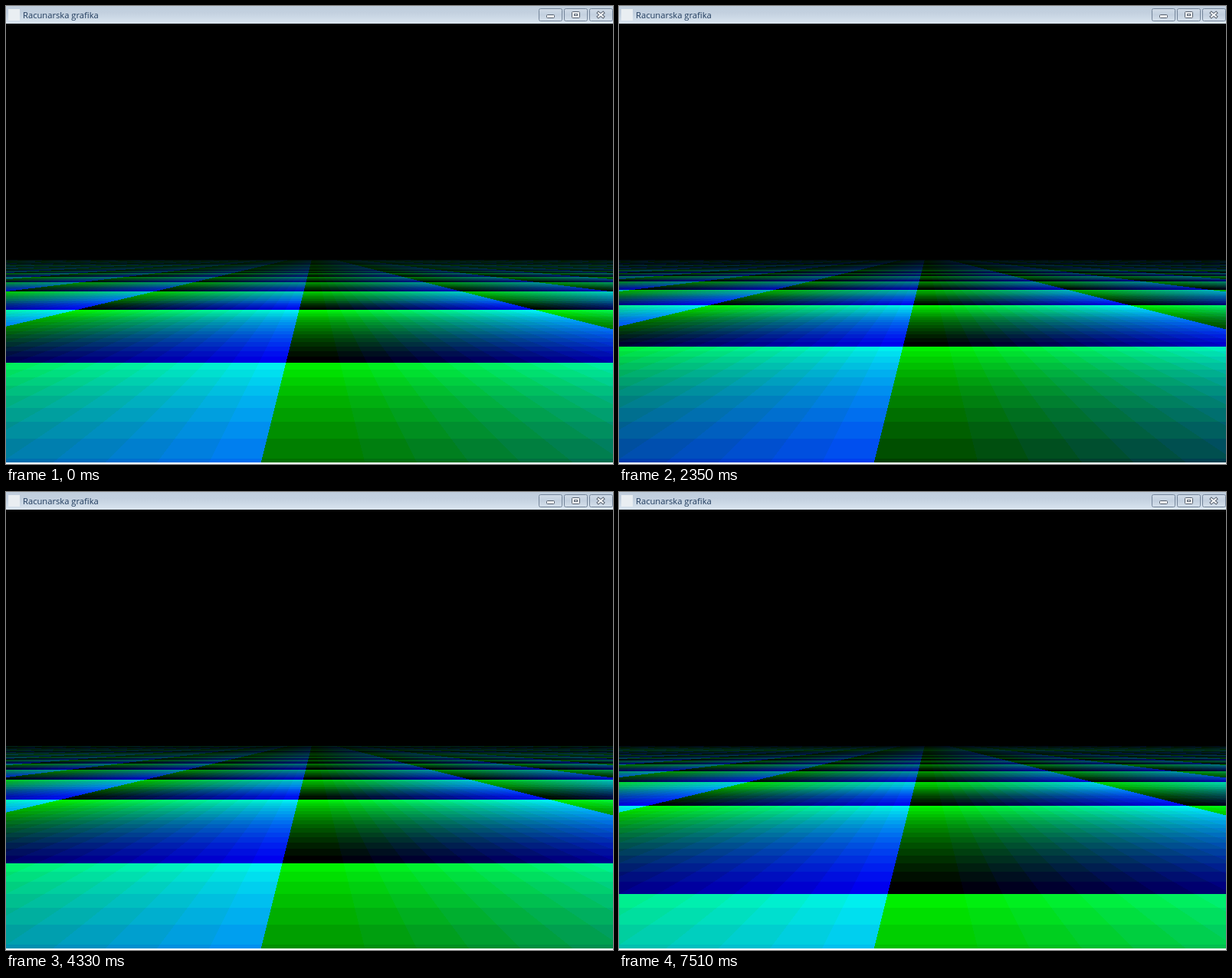
An HTML page with a canvas for the animation above (7.58 s loop, 792x597 px).

```html
<!DOCTYPE html>
<html lang="sr">
<head>
<meta charset="utf-8">
<title>Racunarska grafika</title>
<style>
  html, body { margin: 0; width: 100%; height: 100%; overflow: hidden; background: #fff; }
  .window { position: relative; width: 792px; height: 597px; overflow: hidden; background: #fff; }
  .bar {
    position: absolute; left: 0; top: 0; width: 792px; height: 23px;
    background: linear-gradient(#bfcddc 0, #c3d0df 9px, #d3dfeb 19px, #dbe6f1 23px);
  }
  .icon { position: absolute; left: 3px; top: 4px; width: 15px; height: 15px; background: #e9eef2; }
  .title {
    position: absolute; left: 22px; top: 4px; line-height: 16px; white-space: pre;
    font: 11.2px/16px "Open Sans", "Noto Sans", sans-serif; color: #1f3a5c;
  }
  .buttons { position: absolute; left: 0; top: 0; }
  canvas { position: absolute; left: 0; top: 23px; background: #000; }
</style>
</head>
<body>
<div class="window">
  <div class="bar">
    <div class="icon"></div>
    <div class="title">Racunarska grafika</div>
    <svg class="buttons" width="792" height="23">
      <defs>
        <linearGradient id="face" x1="0" y1="0" x2="0" y2="1">
          <stop offset="0" stop-color="#d0dbe7"/>
          <stop offset=".5" stop-color="#c3d0df"/>
          <stop offset="1" stop-color="#d6e1ec"/>
        </linearGradient>
      </defs>
      <g fill="url(#face)" stroke="#75869b">
        <rect x="695.5" y="3.5" width="30" height="16" rx="2"/>
        <rect x="728.5" y="3.5" width="30" height="16" rx="2"/>
        <rect x="761.5" y="3.5" width="30" height="16" rx="2"/>
      </g>
      <g fill="#f4f6f8" stroke="#56606e">
        <rect x="705.5" y="11.5" width="10" height="4" rx="1"/>
        <rect x="738.5" y="7.5" width="10" height="8" rx="1"/>
        <rect x="741.5" y="10.5" width="4" height="2"/>
      </g>
      <g fill="none" stroke-linecap="square">
        <path d="M773 9l6 5M779 9l-6 5" stroke="#56606e" stroke-width="4"/>
        <path d="M773 9l6 5M779 9l-6 5" stroke="#f4f6f8" stroke-width="2"/>
      </g>
    </svg>
  </div>
  <canvas id="view" width="792" height="572"></canvas>
</div>
<script>
const LOOP = 7580;
const W = 792, H = 572;
const CX = 400, HORIZON = 300, NEAR = 8;
const FOG = 10000;

// Bursts of steps: first time, last time, number of steps
const bursts = [
  [70, 760, 9], [840, 1550, 10], [1630, 1630, 1], [1790, 2110, 5],
  [2270, 2990, 10], [3070, 3620, 8], [3780, 4100, 5], [4250, 4410, 3],
  [4570, 5280, 10], [5350, 5590, 4], [5760, 5760, 1], [5920, 5920, 1],
  [6150, 6870, 10], [7030, 7510, 7]
];
const stepTimes = bursts.flatMap(([from, to, n]) =>
  Array.from({ length: n }, (_, i) =>
    Math.round((from + (to - from) * i / Math.max(1, n - 1)) / 10) * 10));

// Distance travelled, in texels, after a number of steps
const path = [[0, 15], [15, 38], [27, 60], [43, 85], [58, 111], [70, 128], [84, 148]];

function travelled(step) {
  let i = 1;
  while (i < path.length - 1 && step > path[i][0]) i++;
  const [s0, p0] = path[i - 1], [s1, p1] = path[i];
  return Math.floor(p0 + (p1 - p0) * (step - s0) / (s1 - s0) + 1e-6);
}

const ctx = document.getElementById("view").getContext("2d");
const top0 = HORIZON + NEAR;
const image = ctx.createImageData(W, H - top0);
const pixels = new Uint32Array(image.data.buffer);

function drawFloor(offset) {
  let p = 0;
  for (let y = top0; y < H; y++) {
    const d = y - HORIZON;
    const z = 2400 / d;
    const light = Math.min(255, Math.floor(FOG / z));
    const green = ((Math.floor(z) + offset) & 15) * 16 * light >> 8;
    for (let x = 0; x < W; x++) {
      const u = Math.trunc((x - CX) * 4 / d) & 15;
      const blue = u * 16 * light >> 8;
      pixels[p++] = (255 << 24 | blue << 16 | green << 8) >>> 0;
    }
  }
  ctx.putImageData(image, 0, top0);
}

let shown = -1;
function tick() {
  const t = performance.now() % LOOP;
  const step = stepTimes.filter(s => s <= t).length;
  if (step !== shown) {
    shown = step;
    drawFloor(travelled(step));
  }
  requestAnimationFrame(tick);
}
tick();
</script>
</body>
</html>
```
